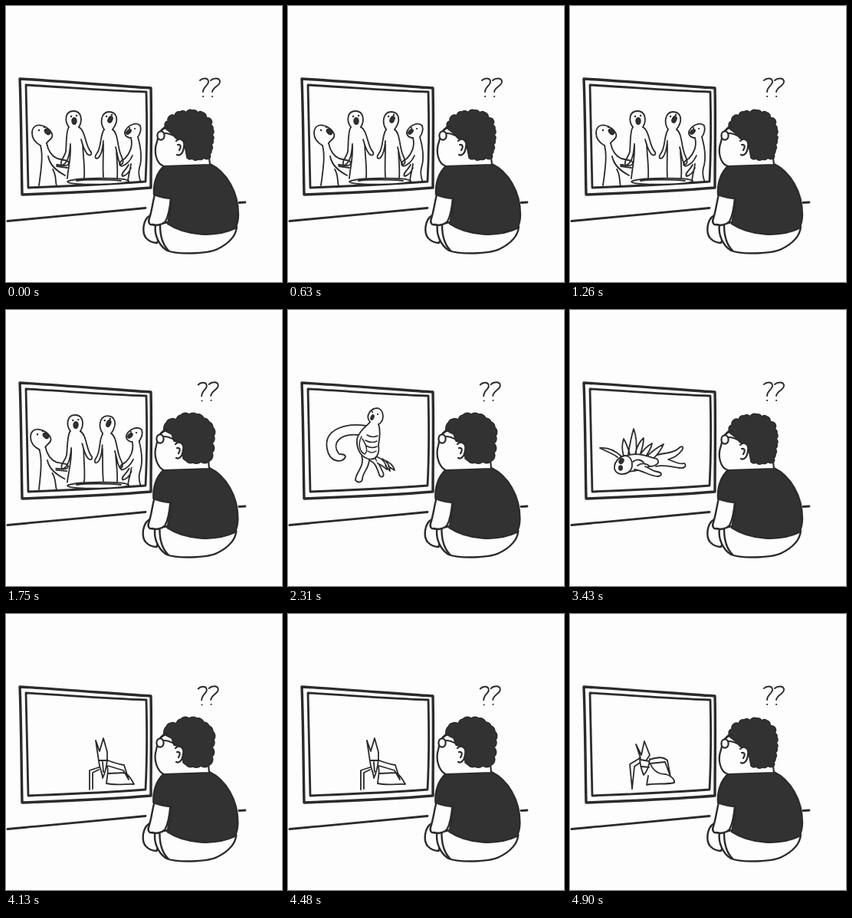
Animation, 360 px wide and 360 px high, one loop 4970 ms. Source, as an HTML page:

```html
<!DOCTYPE html>
<html>
<head>
<meta charset="utf-8">
<style>
html, body { margin: 0; width: 100%; height: 100%; overflow: hidden; background: #fdfdfd; }
svg { display: block; width: 100vw; height: 100vh; }
path, ellipse { stroke: #2b2b2b; stroke-linecap: round; stroke-linejoin: round; fill: none; }
.w { fill: #fdfdfd; }
.k { fill: #323232; }
</style>
</head>
<body>
<svg viewBox="0 0 360 360">
  <g id="room" stroke-width="2.8">
    <path stroke-width="3.4" d="M18 95C70 98 130 103 189 107C190 150 189 195 189 237C130 242 70 244 21 246C20 200 20 145 18 95Z"/>
    <path d="M26 103C80 106 130 110 183 112C184 150 184 190 182 229C130 233 80 235 29 237C28 190 27 150 26 103Z"/>
    <path d="M2 280.5C60 275 125 269 182 263.5M304 256.5L312 256"/>
  </g>

  <g id="choir" stroke-width="1.8">
    <g class="singer" data-x="50" data-y="235">
      <path class="w" d="M45 182C38 178 34 172 34 166C34 157 40 154 47 156C55 158 62 166 60 171C58 175 54 176 53 179"/>
      <path d="M45 182C48 193 47 206 43 234M53 179C55 189 60 196 67 199L80 202C84 205 81 209 75 208L66 207M55 196C57 208 66 215 77 221M66 209L80 211M61 213C66 221 64 228 66 235"/>
      <ellipse class="k" cx="54" cy="164" rx="2.6" ry="4" transform="rotate(-45 54 164)"/>
      <path stroke-width="2.4" d="M43 162h.1M50 158h.1"/>
    </g>
    <g class="singer" data-x="90" data-y="224">
      <path class="w" d="M82 158C76 150 77 137 88 137C99 137 100 150 95 158"/>
      <path d="M82 158C78 163 79 180 78 190C76 198 69 203 73 208C79 206 83 197 84 180M84 182C85 197 81 212 80 225M95 158C103 162 103 178 109 188C114 193 110 197 106 193C102 188 100 182 98 174M100 180C101 200 103 212 102 224"/>
      <ellipse class="k" cx="89" cy="150" rx="2.8" ry="4.2"/>
      <path stroke-width="2.4" d="M85 144h.1M92 143h.1"/>
    </g>
    <g class="singer" data-x="135" data-y="224">
      <path class="w" d="M128 161C122 152 124 139 134 138C145 138 148 149 139 161"/>
      <path d="M128 161C122 170 125 185 118 193C114 199 119 201 122 196C126 190 126 185 127 176M127 180C127 200 126 212 127 223M139 161C146 166 145 180 149 192C152 200 155 204 150 207C146 204 146 195 143 184M144 190C145 205 146 215 145 224"/>
      <ellipse class="k" cx="136" cy="148" rx="2.4" ry="4.2" transform="rotate(25 136 148)"/>
      <path stroke-width="2.4" d="M131 144h.1M138 142h.1"/>
    </g>
    <g class="singer" data-x="168" data-y="230">
      <path class="w" d="M163 172C157 172 153 167 156 162C160 155 170 151 175 156C177 162 174 168 172 171"/>
      <path d="M172 171C176 185 178 199 174 211C172 219 174 225 176 230M163 172C166 183 161 193 155 199C149 202 145 207 151 209C157 207 162 202 165 195M160 207C156 215 149 218 152 222C157 221 161 216 163 211M163 206C162 215 159 222 159 230"/>
      <ellipse class="k" cx="160" cy="164" rx="2" ry="3.6" transform="rotate(45 160 164)"/>
      <path stroke-width="2.2" d="M161 159h.1M168 160h.1"/>
    </g>
    <path class="w" d="M80 229C88 224 152 223 160 228C164 233 82 235 80 229ZM92 228C105 226 135 226 150 228"/>
  </g>

  <g id="walker" stroke-width="1.8">
    <path id="legL" class="w" d="M96 190C101 203 87 214 88 222C91 226 97 225 97 220C98 211 106 206 106 195"/>
    <path id="legR" class="w" d="M106 196C114 199 116 206 119 215C122 220 126 217 124 212C121 205 117 198 113 192"/>
    <path class="w" d="M114 191C122 193 128 199 129 208C125 205 122 202 117 200M123 194C130 198 133 203 133 210L127 203M126 196C133 198 138 204 139 209L131 204"/>
    <path id="whip" d="M102 151C76 147 46 155 51 181C54 200 73 200 75 191C73 186 68 190 66 187C57 175 66 160 93 163"/>
    <path class="w" d="M107 146C103 152 94 155 90 168C89 180 94 191 104 194C115 197 120 188 118 176C120 166 121 158 118 148"/>
    <path class="w" d="M107 146C100 138 108 128 117 128C126 131 126 145 118 149"/>
    <path stroke-width="1.5" d="M103 163C108 166 113 166 117 164M101 170C106 173 112 173 116 171M102 177C107 180 112 180 116 178M104 184C108 187 112 186 115 184M96 165C91 174 93 185 100 188C105 184 102 176 97 168"/>
    <ellipse class="k" cx="110" cy="140" rx="1.6" ry="3.2" transform="rotate(20 110 140)"/>
    <path stroke-width="2.2" d="M110 133h.1M117 136h.1"/>
  </g>

  <g id="swimmer" stroke-width="1.8">
    <g id="tail"><path class="w" d="M108 191C120 185 132 189 141 181C146 176 149 178 146 183C140 191 134 193 128 195C137 198 143 202 149 200C153 203 149 207 143 206C132 205 122 201 112 204"/></g>
    <g id="fins">
      <path class="w" d="M67 191C59 183 49 179 39 180C46 184 54 186 62 192M70 190C67 181 68 174 70 168C74 175 76 181 78 188M76 188C78 175 80 165 83 155C88 168 87 179 86 188M85 188C87 179 91 171 96 167C96 177 93 184 91 190M90 191C95 183 101 177 107 174C105 183 101 188 98 192M98 193C106 185 114 179 122 175C118 185 111 192 105 197"/>
    </g>
    <path class="w" d="M74 190C88 185 101 191 113 194C119 199 112 204 103 204C94 209 84 210 76 211"/>
    <path class="w" d="M84 208C95 209 104 217 115 217C121 216 120 212 114 211C107 210 104 206 98 204"/>
    <path class="w" d="M76 191C68 187 57 197 58 207C60 215 71 216 77 211C83 206 82 195 76 191Z"/>
    <path d="M82 198C87 194 93 195 96 199M88 203C93 199 99 200 103 203"/>
    <ellipse class="k" cx="67" cy="197" rx="2.4" ry="3.4" transform="rotate(35 67 197)"/>
    <ellipse class="k" cx="66" cy="206" rx="2.1" ry="2.8"/>
  </g>

  <path id="crab" stroke-width="1.8"/>

  <g id="man" stroke-width="2.4">
    <path class="w" d="M188 273C178 279 177 296 183 303C187 307 192 309 197 309L206 285Z"/>
    <path class="w" d="M195 285C193 298 199 312 210 319C222 324 262 324 276 317C292 309 300 299 301 288L212 282Z"/>
    <path d="M201 286C201 300 205 312 212 319"/>
    <path class="w" d="M194 246C191 258 190 268 187 277C185 282 187 286 191 285C197 287 204 285 208 281C212 274 214 262 215 250Z"/>
    <path class="k" d="M206 209C224 207 249 208 266 206C287 216 303 242 303 272C303 281 301 286 299 290C274 302 235 300 211 284C213 274 216 262 216 251C207 251 200 249 193 246C192 231 197 217 206 209Z"/>
  </g>
  <g stroke-width="2.2">
    <path id="face" class="w"/>
    <path id="hair" class="k" stroke-width="1.5"/>
    <g id="front">
      <path class="w" d="M222 176C227 171 234 175 232 184C231 192 227 196 223 194"/>
      <path d="M224 181C228 180 229 184 226 188"/>
      <ellipse class="w" cx="202" cy="169" rx="4.6" ry="5.6"/>
      <path d="M207 166C212 166 217 168 222 171M203 162L210 157"/>
    </g>
  </g>
  <g id="marks" stroke-width="1.9">
    <path d="M253 97C256 94 263 93 264 98C265 103 257 105 257 112M257 118h.3M267 97C270 94 278 93 279 98C280 104 270 105 269 112M269 118h.3"/>
  </g>
</svg>
<script>
const STEP = 70, LOOP = 4970, HELD = [1, 30, 55];
const $ = id => document.getElementById(id);
const set = (el, name, v) => el.setAttribute(name, v);
const move = (el, v) => set(el, 'transform', v);
const singers = [...document.querySelectorAll('.singer')];

// Two crab poses with the same structure, blended number by number
const crabA = 'M92 188L86 170L93 184L97 166L104 184L100 190M91 187C91 199 95 207 96 210C99 207 103 200 104 189M92 190L103 192M94 199L103 200M91 188L78 196L81 228M91 194L84 199L81 228M104 190C112 187 121 185 127 191L131 212M104 195L124 193L131 212M105 196C109 205 115 209 125 209C134 212 137 217 136 220C123 223 111 220 100 223L102 211';
const crabB = 'M121 192L117 165L122 179L127 162L132 180L132 192M121 192C122 202 126 208 126 214C129 208 131 201 132 190M121 191L133 191M126 193L127 206M121 200L109 204L109 229M121 203L113 207L113 228M133 191C138 193 147 196 154 197L160 216M133 198L153 204L160 216M132 199C134 205 132 210 131 221C144 224 158 221 167 222C163 214 160 210 155 207L134 208';
const nums = s => s.match(/-?[\d.]+/g).map(Number);
const poseA = nums(crabA), poseB = nums(crabB).map((v, i) => i % 2 ? v : v - 31);
function crabPath(k) {
  let i = 0;
  return crabA.replace(/-?[\d.]+/g, () => {
    const v = poseA[i] + (poseB[i] - poseA[i]) * k;
    i++;
    return v.toFixed(1);
  });
}

// Hair outline made of small outward bumps
const curls = (pts, r, end) =>
  'M' + pts[0] + pts.slice(1).map(p => `A${r} ${r} 0 0 1 ${p}`).join('') + end;
const heads = [
  {
    hair: curls(['207 155', '211 150', '212 145', '220 143', '227 138', '235 139', '243 136', '250 139', '257 139',
      '261 146', '268 149', '267 155', '270 161', '269 168', '270 175', '268 181', '268 188', '266 193', '266 198',
      '258 198', '251 200', '243 199', '236 198'], 5.5, 'L234 187L231 177L226 175L221 172L218 168L208 160Z'),
    face: 'M207 158C200 163 198 170 197 177C192 190 196 206 206 209L266 207L262 170Z'
  },
  {
    hair: curls(['206 157', '206 153', '209 147', '215 142', '222 143', '228 137', '239 136', '249 136', '258 141',
      '265 146', '270 153', '271 164', '269 174', '269 186', '265 197', '254 198', '244 199', '235 197'], 8,
      'L231 194L230 178L226 173L219 171L216 162Z'),
    face: 'M206 157C199 162 197 169 196 177C192 190 197 205 206 209L265 207L262 170Z'
  }
];

function draw(t) {
  let n = Math.floor((t % LOOP) / STEP);
  if (HELD.includes(n)) n--;
  const angle = 2 * Math.PI * (n * 3 / 13 - 0.13);
  const k = Math.min(1, Math.max(0, 0.5 - 0.8 * Math.cos(angle)));
  const alt = k > 0.5 ? 1 : 0;

  const scene = n < 31 ? 'choir' : n < 47 ? 'walker' : n < 56 ? 'swimmer' : 'crab';
  for (const id of ['choir', 'walker', 'swimmer', 'crab']) set($(id), 'display', id === scene ? 'inline' : 'none');

  if (scene === 'choir') {
    singers.forEach((s, i) =>
      move(s, `rotate(${(i % 2 ? 1 : -1) * 1.6 * k} ${s.dataset.x} ${s.dataset.y})`));
  } else if (scene === 'walker') {
    const back = 1 - k;
    move($('walker'), `translate(${(n - 33) * 2.2} ${-back})`);
    move($('whip'), `rotate(${-7 * back} 100 156)`);
    move($('legL'), `rotate(${-22 * back} 101 192)`);
    move($('legR'), `rotate(${24 * back} 110 194)`);
  } else if (scene === 'swimmer') {
    const w = k - 0.15;
    move($('swimmer'), `translate(0 ${-1.5 * w})`);
    move($('tail'), `rotate(${7 * w} 110 198)`);
    move($('fins'), `translate(90 190) skewX(${5 * w}) translate(-90 -190)`);
  } else {
    set($('crab'), 'd', crabPath(k));
    move($('crab'), `translate(${(70 - n) * 2.82} 0)`);
  }

  set($('hair'), 'd', heads[alt].hair);
  set($('face'), 'd', heads[alt].face);
  move($('front'), `translate(${-alt} ${-alt})`);
  move($('man'), `translate(${-alt * 0.6} 0)`);
  move($('marks'), alt ? 'translate(-2 0) rotate(-2 267 106)' : '');
}

const start = performance.now();
function tick() {
  draw(performance.now() - start);
  requestAnimationFrame(tick);
}
draw(0);
requestAnimationFrame(tick);
</script>
</body>
</html>
```
